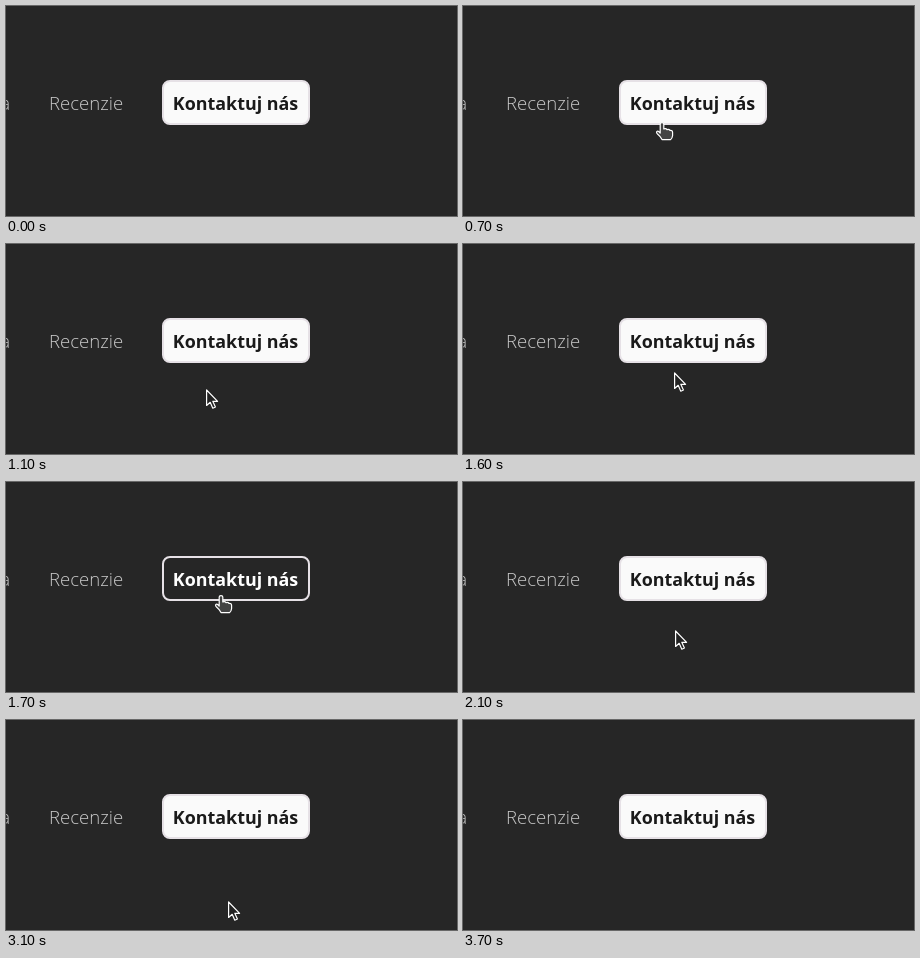
Animation, 451 px wide and 210 px high, one loop 5.1 s. Source, as an HTML page:

```html
<!DOCTYPE html>
<html lang="sk">
<head>
<meta charset="utf-8">
<style>
  html, body { margin: 0; height: 100%; overflow: hidden; background: #262626; }
  svg { display: block; font-family: "Open Sans", "Noto Sans", sans-serif; }
  .link { font-size: 18.6px; font-weight: 300; fill: #c8c8c8; }
  .label { font-size: 17.9px; font-weight: 700; text-anchor: middle; }
  .cursor { stroke: #fff; stroke-width: 1.2; stroke-linejoin: round; }
</style>
</head>
<body>
<svg width="451" height="210" viewBox="0 0 451 210">
  <text class="link" x="4" y="104" text-anchor="end">a</text>
  <text class="link" x="80" y="104" text-anchor="middle">Recenzie</text>
  <rect id="button" x="157" y="75" width="146" height="43" rx="7" stroke="#e6e1e6" stroke-width="2"/>
  <text id="label" class="label" x="229.5" y="104">Kontaktuj nás</text>
  <g id="cursor" class="cursor">
    <path id="arrow" fill="#222" d="M.6 1V16.5L4.2 13.3L6.8 19.2L9.4 18L6.8 12.3H11.6Z"/>
    <path id="hand" fill="#444" d="M-1.8 11V2Q-1.8.6 0 .6T1.8 2V7Q4 6 5 7.6Q7 6.8 8 8.4Q10.6 8 10.6 10.5V13.5Q10.4 16 8.6 17.6H0Q-1.4 14.6-4 12.6Q-6.4 10.2-4.8 9.3Q-3.6 8.8-1.8 11Z"/>
  </g>
</svg>
<script>
const LOOP = 5100, TICK = 100, HOVER_DELAY = 40, BUTTON_BOTTOM = 119;
const $ = id => document.getElementById(id);
const button = $("button"), label = $("label"), cursor = $("cursor"), arrow = $("arrow"), hand = $("hand");

// pointer moves: start, duration, x and y of the goal; it rests in between
const start = [188, 240];
const moves = [
  [400, 100, 190, 198],
  [500, 400, 201, 98],
  [1000, 300, 199, 171],
  [1500, 250, 215, 112],
  [1900, 300, 212, 150],
  [2500, 250, 230, 108],
  [2900, 200, 222, 181],
  [3100, 600, 274, 211]
];

const clamp = v => Math.min(1, Math.max(0, v));
const easeOut = v => 1 - (1 - v) ** 2.5;

function pointer(t) {
  return moves.reduce(([x, y], [from, span, goalX, goalY]) => {
    const k = easeOut(clamp((t - from) / span));
    return [x + (goalX - x) * k, y + (goalY - y) * k];
  }, start);
}

const isOver = t => pointer(t)[1] < BUTTON_BOTTOM;
const show = (el, on) => el.setAttribute("visibility", on ? "visible" : "hidden");

function draw(now) {
  const t = Math.floor(now % LOOP / TICK) * TICK;
  const [x, y] = pointer(t).map(Math.round);
  const over = isOver(t);
  const filled = !(over && isOver(t - HOVER_DELAY));
  button.setAttribute("fill", filled ? "#fafafa" : "#262626");
  label.setAttribute("fill", filled ? "#1a1a1a" : "#fff");
  cursor.setAttribute("transform", `translate(${x} ${y})`);
  show(arrow, !over);
  show(hand, over);
}

function frame() {
  draw(performance.now());
  requestAnimationFrame(frame);
}
frame();
</script>
</body>
</html>
```
